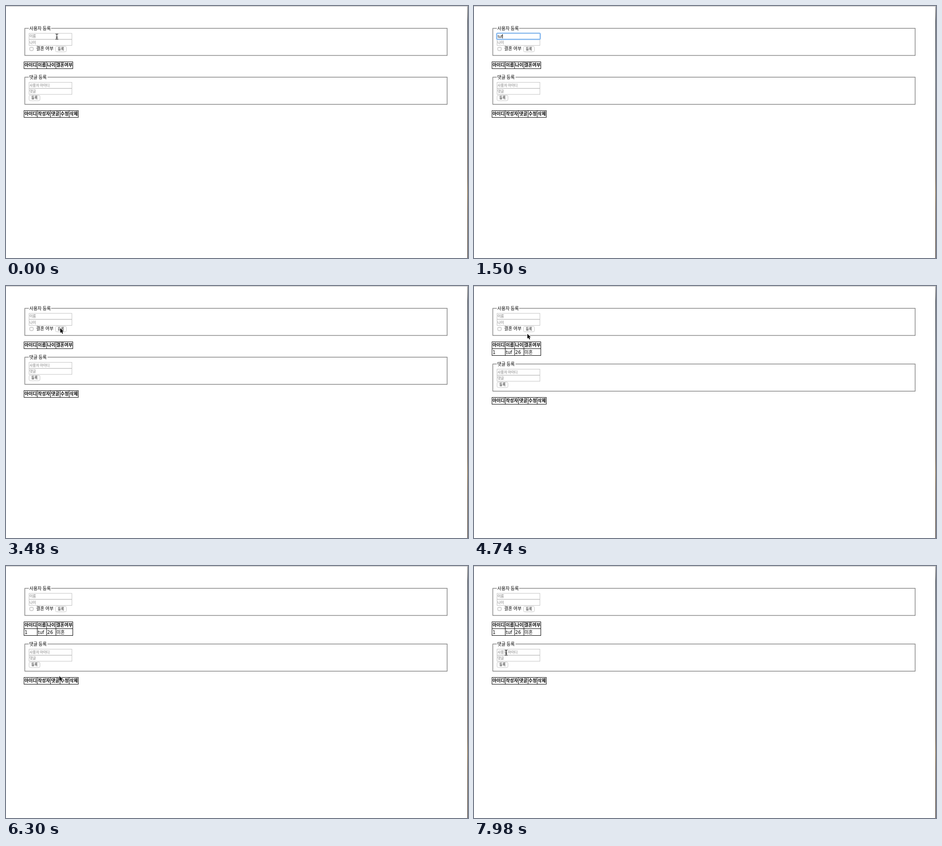
An HTML page with a canvas for the animation above (8 s loop, 1013 by 553 pixels).

```html
<!DOCTYPE html>
<html lang="ko">
<head>
<meta charset="utf-8">
<style>
  html, body { margin: 0; width: 100%; height: 100%; overflow: hidden; background: #fff; }
  canvas { display: block; }
</style>
</head>
<body>
<canvas id="stage" width="1013" height="553"></canvas>
<script>
const g = document.getElementById('stage').getContext('2d');
const LOOP = 8000, STEP = 60;
const KR = '"Noto Sans CJK KR", "Noto Sans CJK", sans-serif';
const UI = 'Inter, "Noto Sans CJK KR", "Noto Sans CJK", sans-serif';
const CELL = '"DejaVu Sans", "Noto Sans CJK KR", sans-serif';
const NAME = 'tuf';
const SUGGESTIONS = ['asd', 'cooking', '123', 'pomuda', 'qkekthf174', '포무다'];

// pointer path: time, x, y
const PATH = [
  [0, 111, 67], [2880, 111, 67], [2940, 112, 76], [3300, 119, 92.5], [4680, 119, 92.5],
  [4740, 117, 105], [4980, 108, 128], [5220, 114, 137], [5520, 114, 130], [5940, 114, 130],
  [6300, 117, 241.5], [6540, 120, 331], [6780, 66, 325], [6900, 80, 345], [7200, 172, 240],
  [7500, 150, 85], [7620, 146, 64], [7800, 100, 241], [7900, 62, 205], [7980, 70, 190]
];

function text(s, x, y, size, font = KR, color = '#000', weight = 400, align = 'left') {
  g.font = `${weight} ${size}px ${font}`;
  g.fillStyle = color;
  g.textAlign = align;
  g.fillText(s, x, y + size * 0.37);
}

function line(x1, y1, x2, y2) {
  g.beginPath();
  g.moveTo(x1, y1);
  g.lineTo(x2, y2);
  g.stroke();
}

function roundBox(x, y, w, h, r, stroke, width = 1) {
  g.beginPath();
  g.roundRect(x, y, w, h, r);
  g.fillStyle = '#fff';
  g.fill();
  g.strokeStyle = stroke;
  g.lineWidth = width;
  g.stroke();
}

function fieldset(y, label, gapEnd) {
  g.strokeStyle = '#868686';
  g.lineWidth = 1.5;
  g.beginPath();
  g.moveTo(50, y);
  g.lineTo(41.3, y);
  g.lineTo(41.3, y + 59.5);
  g.lineTo(967.3, y + 59.5);
  g.lineTo(967.3, y);
  g.lineTo(gapEnd, y);
  g.stroke();
  text(label, 51, y, 9.8);
}

function input(y, placeholder, value) {
  g.strokeStyle = '#c2c2c2';
  g.lineWidth = 1;
  g.strokeRect(50.5, y, 94, 13);
  if (value) text(value, 52, y + 6.7, 7.9, UI);
  else text(placeholder, 51.5, y + 6.5, 7.7, KR, '#777');
}

function ring(y, alpha) {
  g.globalAlpha = alpha;
  roundBox(50, y + 0.2, 95, 13, 1.5, '#a9cdf5', 3);
  roundBox(50.3, y + 0.4, 94.4, 12.6, 1, '#68a6e8', 1.3);
  g.globalAlpha = 1;
}

function caret(x, y) {
  g.fillStyle = '#000';
  g.fillRect(x, y, 1, 9);
}

function button(x, y) {
  roundBox(x + 0.5, y + 0.5, 24, 12, 3, '#c4c4c4');
  text('등록', x + 12.5, y + 6.3, 7.6, KR, '#000', 400, 'center');
}

function table(y, xs, heads, row) {
  const bottom = y + (row ? 30 : 15), right = xs[xs.length - 1];
  g.strokeStyle = '#000';
  g.lineWidth = 1;
  xs.forEach(x => line(x, y - 0.5, x, bottom + 0.5));
  for (let ly = y; ly <= bottom; ly += 15) line(xs[0], ly, right, ly);
  heads.forEach((h, i) => text(h, (xs[i] + xs[i + 1]) / 2, y + 7.2, 9.7, KR, '#000', 700, 'center'));
  if (row) row.forEach((c, i) => text(c, xs[i] + 1.3, y + 22.5, i < 3 ? 10 : 9.7, CELL));
}

function dropdown(alpha) {
  g.save();
  g.globalAlpha = alpha;
  g.shadowColor = 'rgba(0,0,0,.35)';
  g.shadowBlur = 4;
  g.shadowOffsetY = 1;
  g.fillStyle = '#fff';
  g.beginPath();
  g.roundRect(49.5, 73.5, 139, 169, 1.5);
  g.fill();
  g.shadowColor = 'transparent';
  SUGGESTIONS.forEach((s, i) => text(s, 58, 93.2 + 26.1 * i, i < 5 ? 9.6 : 9, UI, '#111', 500));
  g.restore();
}

function spinner() {
  g.fillStyle = '#f1f1f1';
  g.fillRect(135, 75, 7, 10);
  g.strokeStyle = '#444';
  g.lineWidth = 0.9;
  for (const d of [-1, 1]) {
    g.beginPath();
    g.moveTo(136.7, 80 + d * 2);
    g.lineTo(138.3, 80 + d * 3.6);
    g.lineTo(139.9, 80 + d * 2);
    g.stroke();
  }
}

function arrow(x, y) {
  g.beginPath();
  [[0, 0], [0, 10.4], [2.4, 8.3], [4.2, 12.2], [6, 11.4], [4.3, 7.6], [7.5, 7.4]]
    .forEach(([dx, dy]) => g.lineTo(x + dx, y + dy));
  g.closePath();
  g.lineJoin = 'round';
  g.strokeStyle = '#fff';
  g.lineWidth = 1.6;
  g.stroke();
  g.fillStyle = '#000';
  g.fill();
  g.lineJoin = 'miter';
}

function beam(x, y) {
  g.strokeStyle = '#111';
  g.lineWidth = 1.1;
  line(x + 0.5, y - 5, x + 0.5, y + 5);
  line(x - 1.5, y + 1.5, x + 2.5, y + 1.5);
  for (const d of [-1, 1]) {
    g.beginPath();
    g.moveTo(x - 2.5, y + d * 5.8);
    g.quadraticCurveTo(x + 0.5, y + d * 5.8, x + 0.5, y + d * 4);
    g.quadraticCurveTo(x + 0.5, y + d * 5.8, x + 3.5, y + d * 5.8);
    g.stroke();
  }
}

function pointer(t, shift) {
  let i = 1;
  while (i < PATH.length - 1 && PATH[i][0] < t) i++;
  const [t0, x0, y0] = PATH[i - 1], [t1, x1, y1] = PATH[i];
  const k = Math.min(1, (t - t0) / (t1 - t0));
  const x = x0 + (x1 - x0) * k, y = y0 + (y1 - y0) * k;
  const inField = x > 50 && x < 145 && (y > 60 && y < 87 || y > 167 + shift && y < 194 + shift);
  (inField ? beam : arrow)(x, y);
}

function windowEdge() {
  g.fillStyle = '#b0b0b0';
  g.fillRect(0, 0, 1013, 1);
  g.fillStyle = '#c9c9c9';
  g.fillRect(1011, 0, 1, 553);
  const edge = g.createLinearGradient(0, 0, 0, 553);
  [[0, '#999'], [.04, '#555'], [.06, '#1c2430'], [.3, '#39424d'], [.5, '#3a3029'],
   [.68, '#4c3520'], [.74, '#7d561f'], [.8, '#5a3d1c'], [1, '#3a2a20']]
    .forEach(([p, c]) => edge.addColorStop(p, c));
  g.fillStyle = edge;
  g.fillRect(1012, 0, 1, 553);
}

function draw(t) {
  const within = (a, b) => t >= a && t < b;
  const saved = t >= 3540, shift = saved ? 15 : 0;
  const letters = t < 1020 || t >= 3420 ? 0 : t < 1260 ? 1 : t < 1500 ? 2 : 3;
  const name = NAME.slice(0, letters);
  const age = within(2400, 3420) ? (t < 2520 ? '2' : '26') : '';
  const onName = within(180, 1740), onAge = within(1740, 3420);

  g.fillStyle = '#fff';
  g.fillRect(0, 0, 1013, 553);
  windowEdge();

  fieldset(49, '사용자 등록', 99);
  if (onName) ring(59.7, t < 240 ? 0.5 : 1);
  input(60, '이름', name);
  input(73.5, '나이', age);
  if (onName) ring(59.7, t < 240 ? 0.5 : 1);
  if (onAge) ring(73.3, t < 1800 ? 0.6 : 1);
  // the ring whitens the box, so the focused content goes on top
  if (onName) {
    if (name) text(name, 52, 66.7, 7.9, UI, t < 1080 ? '#aaa' : '#000');
    else text('이름', 51.5, 66.5, 7.7, KR, '#777');
    if (!within(720, 1020)) caret(52 + (name ? g.measureText(name).width : -0.5), 62);
  }
  if (onAge) {
    if (age) text(age, 52, 80.2, 7.9, UI);
    else text('나이', 51.5, 80, 7.7, KR, '#777');
    if (!within(2220, 2400) && !within(3060, 3420))
      caret(52 + (age ? g.measureText(age).width : -0.5), 75.5);
    spinner();
  }
  roundBox(52.2, 90.5, 7.4, 7.4, 1.5, '#a5a5a5');
  text('결혼 여부', 66, 93.8, 9.8);
  button(108, 88);

  table(122.5, [39.5, 68.5, 89, 109.5, 146.5], ['아이디', '이름', '나이', '결혼여부'],
    saved && ['1', NAME, '26', '미혼']);

  fieldset(156.2 + shift, '댓글 등록', 91);
  input(167.5 + shift, '사용자 아이디');
  input(181 + shift, '댓글');
  button(50, 195.3 + shift);
  table(229.5 + shift, [39.5, 68.5, 97.5, 118.5, 138.5, 158.5],
    ['아이디', '작성자', '댓글', '수정', '삭제']);

  if (within(240, 1200)) dropdown(t < 1140 ? 1 : 0.4);
  if (!within(1020, 2940)) pointer(t, shift);
}

function tick() {
  const t = performance.now() % LOOP;
  draw(Math.floor(t / STEP) * STEP);
  requestAnimationFrame(tick);
}
tick();
</script>
</body>
</html>
```
